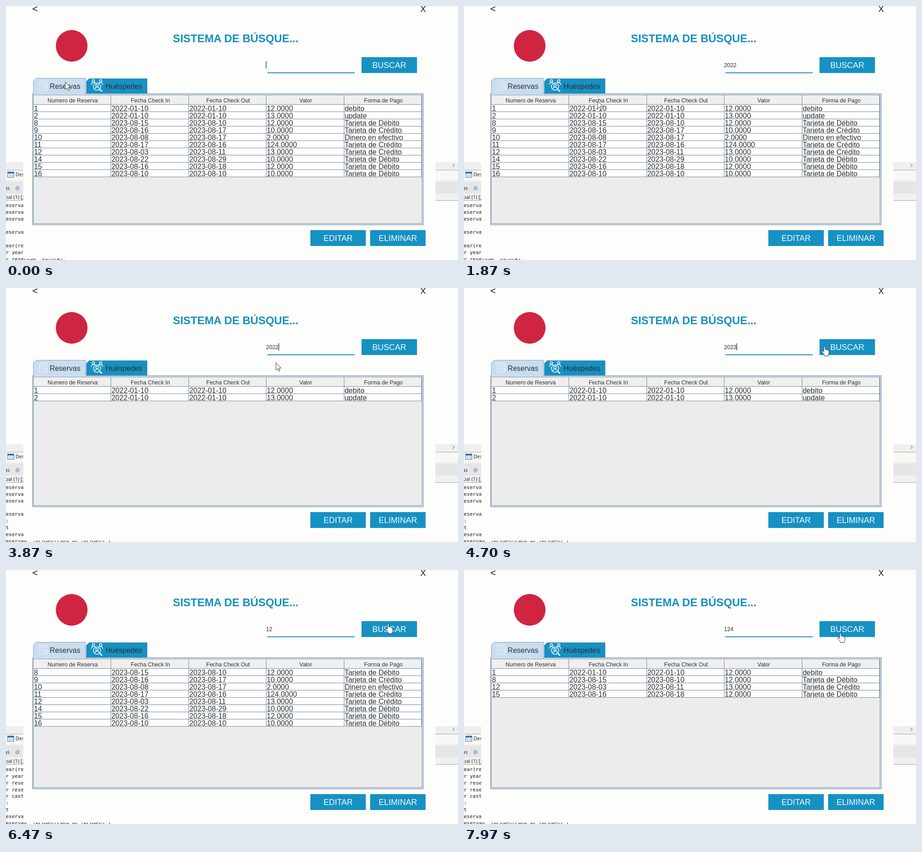
Write an HTML page that moves like this. It is 998 px wide and 561 px high and loops after 8000 ms.

```html
<!DOCTYPE html>
<html lang="es">
<head>
<meta charset="utf-8">
<title>Sistema de búsqueda</title>
<style>
  html, body { margin: 0; width: 100%; height: 100%; overflow: hidden; background: #fdfdfc; }
  #stage { display: block; width: 100vw; height: 100vh; }
  text { font-family: "Liberation Sans", Arial, sans-serif; fill: #303030; white-space: pre; }
  .title { font-size: 24.2px; font-weight: bold; fill: #1690c2; }
  .button rect { fill: #1691c3; }
  .button text { font-size: 18px; fill: #f4fafd; text-anchor: middle; }
  .tab { font-size: 16px; }
  .head { font-size: 12.4px; text-anchor: middle; }
  .cell { font-size: 16px; }
  .query { font-size: 12.5px; }
  .ide { font-family: "Open Sans", "Noto Sans", sans-serif; font-size: 11px; fill: #1c1c1c; }
  .log { font-family: "DejaVu Sans Mono", monospace; font-size: 11px; fill: #181818; }
  .rule { fill: #71889a; }
  .glyph { fill: none; stroke: #f4fafd; stroke-width: 1.5; }
  .pointer { fill: #fff; stroke: #333; stroke-width: 1; stroke-linejoin: round; }
</style>
</head>
<body>
<svg id="stage" viewBox="0 0 998 561" preserveAspectRatio="none">
  <rect width="998" height="561" fill="#fdfdfc"/>

  <!-- editor behind the window -->
  <rect y="345" width="998" height="18" fill="#efefef"/>
  <rect y="362" width="998" height="1" fill="#a8a8a8"/>
  <rect y="363" width="998" height="22" fill="#f8f8f5"/>
  <rect y="385" width="998" height="3" fill="#eeeeee"/>
  <rect y="388" width="998" height="26" fill="#e6e6e8"/>
  <rect y="414" width="998" height="16" fill="#f1f1f0"/>
  <rect y="429" width="998" height="1" fill="#a0a0a0"/>
  <path d="M986 348.5l4 3.5-4 3.5" fill="none" stroke="#999" stroke-width="1.4"/>
  <rect x="3.5" y="366.5" width="14" height="12" fill="#eef5fc" stroke="#3d6fa8"/>
  <path d="M4 368.5h13" stroke="#3d6fa8" stroke-width="3"/>
  <path d="M6 372.5h4m2 0h4M6 375.5h4m2 0h4" stroke="#6a95c4"/>
  <text class="ide" x="21" y="376">Design</text>
  <text class="ide" x="-3.4" y="406">as</text>
  <text class="ide" x="20.5" y="406" style="fill:#2a78ae">@</text>
  <text class="ide" x="-2" y="426">pal (1) [Java</text>
  <g id="log"></g>

  <!-- search window -->
  <rect x="38" width="910" height="558" fill="#fdfdfc"/>
  <text x="58" y="13" style="font-size:21px;fill:#111">&lt;</text>
  <text x="915" y="13" style="font-size:18px;fill:#111">X</text>
  <circle cx="145" cy="88" r="35" fill="#cf2540"/>
  <text class="title" x="368.5" y="80">SISTEMA DE BÚSQUE...</text>
  <rect x="577" y="146.5" width="193" height="2" fill="#1690c2"/>
  <g id="buttons"></g>

  <path d="M60.5 194V165.5l6-6H175.5V194z" fill="#c8ddf0" stroke="#8b9fb6"/>
  <path d="M177.5 194V166.5l6-6H311.5V194z" fill="#1691c3" stroke="#4f87a6"/>
  <g class="glyph">
    <path d="M74 167h17v20h-17zM74 172h17M78 164v5m4.5-5v5m4.5-5v5M77 176h3m3 0h5M77 180h3M77 184h4" stroke-width="1.2" opacity=".8"/>
    <circle cx="86" cy="181" r="3.5" stroke-width="1.2" opacity=".8"/>
    <circle cx="193" cy="165.5" r="2.7"/>
    <circle cx="209" cy="165.5" r="2.7"/>
    <path d="M188.5 174v-1q1-4 5-4t4 2M213.5 174v-1q-1-4-5-4t-4 2"/>
    <circle cx="201" cy="178" r="8"/>
    <circle cx="201" cy="175.5" r="2.7"/>
    <path d="M196 183q1-4 5-4t5 4"/>
    <path d="M207 184l5 5" stroke-width="2.5"/>
  </g>
  <text class="tab" x="96.6" y="183">Reservas</text>
  <text class="tab" x="219.7" y="183">Huéspedes</text>

  <rect x="58.5" y="193.5" width="863" height="290" fill="#d3e3f1" stroke="#7b90a6"/>
  <rect x="61" y="193" width="114" height="1" fill="#c8ddf0"/>
  <rect x="60.5" y="196.5" width="858" height="284" fill="#ececec" stroke="#7f8fa0"/>
  <rect x="61" y="197" width="856" height="20" fill="#efefef"/>
  <rect class="rule" x="61" y="217" width="856" height="1"/>
  <g id="heads"></g>
  <g id="rows"></g>

  <text id="query" class="query" x="574" y="134.5"></text>
  <rect id="caret" y="122" width="1.2" height="16" fill="#222"/>

  <g id="pointer">
    <path data-kind="arrow" class="pointer" d="M0 0V16.5L3.8 13l2.7 6 2.5-1.1L6.4 12H11.5z"/>
    <path data-kind="beam" d="M-3.5-7.5H-1L0-6.5 1-7.5H3.5M0-6.5V6.5M-3.5 7.5H-1L0 6.5 1 7.5H3.5" fill="none" stroke="#222" stroke-width="1.3"/>
    <path data-kind="hand" class="pointer" d="M-1.5 1.5q0-1.5 1.5-1.5t1.5 1.5V7q2.5-1 3 .8 2.5-.8 3 1 2.5-.5 2.5 1.7V15q0 2.5-1.5 4v2.5H0V19L-5.5 12.5q-1-2 .8-2.5 1.5 0 3.2 2z"/>
  </g>
</svg>

<script>
const LOOP = 8000;
const $ = id => document.getElementById(id);

const edges = [60, 231, 403, 574, 746, 917];
const heads = ["Numero de Reserva", "Fecha Check In", "Fecha Check Out", "Valor", "Forma de Pago"];
const debit = "Tarjeta de Débito", credit = "Tarjeta de Crédito";
const bookings = [
  ["1", "2022-01-10", "2022-01-10", "12.0000", "debito"],
  ["2", "2022-01-10", "2022-01-10", "13.0000", "update"],
  ["8", "2023-08-15", "2023-08-10", "12.0000", debit],
  ["9", "2023-08-16", "2023-08-17", "10.0000", credit],
  ["10", "2023-08-08", "2023-08-17", "2.0000", "Dinero en efectivo"],
  ["11", "2023-08-17", "2023-08-16", "124.0000", credit],
  ["12", "2023-08-03", "2023-08-11", "13.0000", credit],
  ["14", "2023-08-22", "2023-08-29", "10.0000", debit],
  ["15", "2023-08-16", "2023-08-18", "12.0000", debit],
  ["16", "2023-08-10", "2023-08-10", "10.0000", debit]
];

const fields = ["eserva0_.fecha", "eserva0_.forma", "eserva0_.valor"];
const where = ["ear(reserva0_)", "r year(reserva)"];
const tail = [":", "t", "eserva0_.id", "eserva0_.fechaEntrada as fechaEn2_1_,"];
const logs = [
  [...fields, "", "eserva0_", "", ...where, "r reserva0_.valor=?;"],
  [...fields, "", "eserva0_", ...tail],
  [...where, "r reserva0_", "r reserva0_", "r cast(", ...tail]
];

// [time, value] steps
const typed = [[0, ""], [960, "2"], [1090, "20"], [1220, "202"], [1350, "2022"],
  [4300, "202"], [4460, "2023"], [5480, "202"], [5560, "20"], [5640, "2"], [5720, ""],
  [5840, "1"], [5980, "12"], [7230, "124"]];
const searched = [[0, ""], [2920, "2022"], [4900, "2023"], [6610, "12"]];
const logged = [[0, 0], [2920, 1], [4900, 2]];

// [time, x, y] of the mouse, eased between stops
const stops = [[0, 131, 168], [60, 131, 168], [540, 632, 140], [1400, 632, 140],
  [1870, 295, 210], [2150, 292, 228], [2720, 842, 130], [3050, 842, 130], [3350, 560, 236],
  [3650, 575, 225], [3870, 596, 165], [4080, 612, 132], [4500, 612, 132], [4780, 840, 128],
  [4980, 840, 128], [5330, 619, 124], [6020, 619, 126], [6400, 844, 119], [6680, 844, 119],
  [7050, 622, 130], [7350, 622, 130], [7850, 831, 139], [8000, 831, 139]];

const stepAt = (steps, t) => steps.filter(s => s[0] <= t).pop()[1];

function mouseAt(t) {
  const i = stops.findIndex(s => s[0] > t);
  const [t0, x0, y0] = stops[i - 1], [t1, x1, y1] = stops[i];
  const p = (t - t0) / (t1 - t0), e = p * p * (3 - 2 * p);
  return [x0 + (x1 - x0) * e, y0 + (y1 - y0) * e];
}

function pointerKind(x, y) {
  if (x > 785 && x < 908 && y > 113 && y < 148) return "hand";
  if (x > 573 && x < 770 && y > 113 && y < 148) return "beam";
  return "arrow";
}

const matches = q => ([id, checkIn, , value]) =>
  !q || id === q || checkIn.startsWith(q + "-") || value === q + ".0000";

function rowSvg(row, i) {
  const cells = row.map((s, c) =>
    `<text class="cell" x="${edges[c] - 59.3}" y="13.6">${s}</text>
     <rect class="rule" x="${edges[c + 1] - 61}" width="1" height="16"/>`).join("");
  return `<svg x="61" y="${218 + 16 * i}" width="857" height="16">
    <rect width="857" height="16" fill="#fefefe"/>${cells}
    <rect class="rule" y="15" width="857" height="1"/></svg>`;
}

const button = (x, y, label) => `<g class="button">
  <rect x="${x}" y="${y}" width="122.5" height="35"/>
  <text x="${x + 61.3}" y="${y + 24}">${label}</text></g>`;

$("buttons").innerHTML = button(785, 113, "BUSCAR") +
  button(672, 495, "EDITAR") + button(804, 495, "ELIMINAR");

$("heads").innerHTML = heads.map((s, c) =>
  `<text class="head" x="${(edges[c] + edges[c + 1]) / 2 + 1.8}" y="212.5">${s}</text>
   <rect class="rule" x="${edges[c + 1]}" y="197" width="1" height="20"/>`).join("");

const shown = {};
function update(key, value, draw) {
  if (shown[key] === value) return;
  shown[key] = value;
  draw(value);
}

function caretOn(t) {
  const early = t % 1000 < 500;
  return t > 2920 && t < 6700 ? !early : early;
}

function render(t) {
  update("rows", stepAt(searched, t), q =>
    $("rows").innerHTML = bookings.filter(matches(q)).map(rowSvg).join(""));
  update("log", stepAt(logged, t), n =>
    $("log").innerHTML = logs[n].map((s, i) =>
      `<text class="log" x="-.5" y="${443.8 + 14.9 * i}">${s}</text>`).join(""));
  update("query", stepAt(typed, t), s => {
    $("query").textContent = s;
    $("caret").setAttribute("x", 573.8 + s.length * 7);
  });
  update("caret", caretOn(t), on => $("caret").style.display = on ? "" : "none");

  const [x, y] = mouseAt(t);
  $("pointer").setAttribute("transform", `translate(${x.toFixed(1)} ${y.toFixed(1)})`);
  update("kind", pointerKind(x, y), kind => {
    for (const p of $("pointer").children) p.style.display = p.dataset.kind === kind ? "" : "none";
  });
}

const start = performance.now();
function tick() {
  render((performance.now() - start) % LOOP);
  requestAnimationFrame(tick);
}
tick();
</script>
</body>
</html>
```
